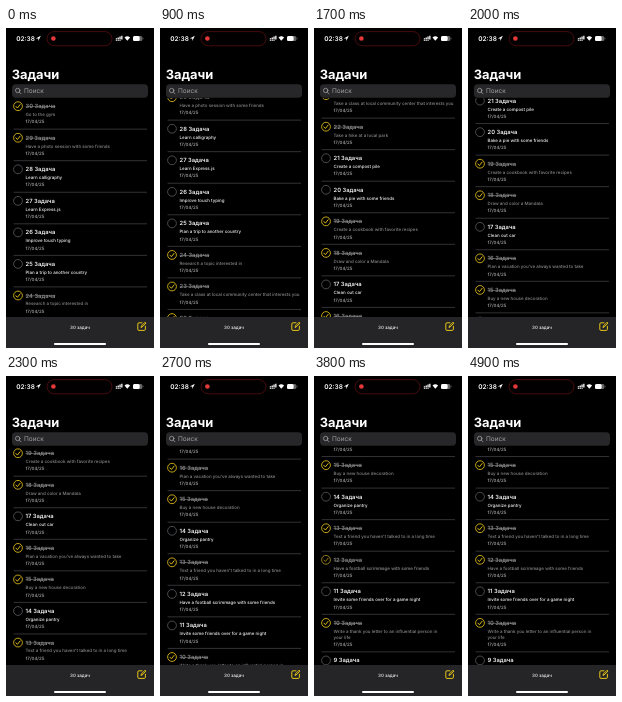
An HTML page that plays this animation: 148 px wide and 320 px high, repeating every 5 s.

```html
<!DOCTYPE html>
<html lang="ru">
<head>
<meta charset="utf-8">
<title>Задачи</title>
<style>
html, body { margin: 0; width: 100%; height: 100%; overflow: hidden; background: #000; }
svg { display: block; width: 100vw; height: 100vh; font-family: Inter, Roboto, sans-serif; text-rendering: geometricPrecision; }
.title { font-size: 5.8px; font-weight: 600; }
.note { font-size: 4.45px; font-weight: 500; }
</style>
</head>
<body>
<svg viewBox="0 0 148 320">
  <defs><clipPath id="view"><rect y="70.3" width="148" height="219"/></clipPath></defs>
  <rect width="148" height="320"/>
  <g clip-path="url(#view)"><g id="list"></g></g>

  <g fill="#fff">
    <text x="10.2" y="12.8" font-size="6.5" font-weight="600">02:38</text>
    <path d="M29.8 10.4L34.8 7.8L32.3 12.9V10.4Z"/>
    <rect x="41" y="3.6" width="65" height="14.2" rx="7.1" fill="#020000" stroke="#5a1014" stroke-width=".8"/>
    <circle cx="47.4" cy="10.5" r="2.3" fill="#e5383a"/>
    <path d="M109.8 10.2h1.3v1.4h-1.3zM111.6 9.4h1.3v2.2h-1.3zM113.4 8.6h1.3v3h-1.3zM115.2 7.8h1.3v3.8h-1.3zM109.8 12.2h1.3v.9h-1.3zM111.6 12.2h1.3v.9h-1.3zM113.4 12.2h1.3v.9h-1.3z"/>
    <path d="M118.5 9.5Q121.3 7 124.1 9.5L121.3 12.8Z"/>
    <rect x="127" y="8.1" width="9.4" height="4.8" rx="1.5" fill="#666"/>
    <rect x="127" y="8.1" width="6.6" height="4.8" rx="1.5"/>
    <rect x="136.8" y="9.7" width=".6" height="1.6" rx=".3" fill="#777"/>
  </g>

  <text x="5.8" y="50.8" font-size="12.9" font-weight="700" fill="#fff">Задачи</text>
  <rect x="6" y="56.2" width="136" height="13.6" rx="3.7" fill="#272729"/>
  <g fill="none" stroke="#a0a0a4" stroke-width=".8" stroke-linecap="round">
    <circle cx="11.7" cy="62.5" r="2.2"/>
    <path d="M13.3 64.1L15 65.8"/>
  </g>
  <text x="18" y="65.3" font-size="6.5" fill="#a0a0a4">Поиск</text>

  <rect y="289" width="148" height="31" fill="#252528"/>
  <text x="74" y="300.6" font-size="4.5" font-weight="500" fill="#f4f4f4" text-anchor="middle">30 задач</text>
  <g fill="none" stroke="#f0cd18" stroke-width=".95" stroke-linecap="round" stroke-linejoin="round">
    <path d="M136 294.8h-3a1.2 1.2 0 0 0-1.2 1.2v5.2a1.2 1.2 0 0 0 1.2 1.2h5.2a1.2 1.2 0 0 0 1.2-1.2v-3"/>
    <path d="M135.1 299.1l.3-1.2 3.7-3.7.9.9-3.7 3.7z"/>
  </g>
  <rect x="48" y="315.1" width="52" height="1.9" rx=".95" fill="#fff"/>
</svg>
<script>
const LOOP = 5000, STEP = 100, PITCH = 31.55, LINE = 6;
const GRAY = '#8a8a8a', DATE = '#b0b0b0', WHITE = '#f4f4f4', YELLOW = '#e6c01c';

// A leading + marks a finished task; | breaks the line.
const TASKS = [
  '+Go to the gym', '+Have a photo session with some friends', 'Learn calligraphy',
  'Learn Express.js', 'Improve touch typing', 'Plan a trip to another country',
  '+Research a topic interested in',
  '+Take a class at local community center that interests you',
  '+Take a hike at a local park', 'Create a compost pile', 'Bake a pie with some friends',
  '+Create a cookbook with favorite recipes', '+Draw and color a Mandala', 'Clean out car',
  "+Plan a vacation you've always wanted to take", '+Buy a new house decoration',
  'Organize pantry', "+Text a friend you haven't talked to in a long time",
  'Have a football scrimmage with some friends', 'Invite some friends over for a game night',
  '+Write a thank you letter to an influential person in|your life', 'Clean the closet'
];

const list = document.getElementById('list');

function add(parent, tag, attrs, text) {
  const el = document.createElementNS('http://www.w3.org/2000/svg', tag);
  for (const k in attrs) el.setAttribute(k, attrs[k]);
  if (text) el.textContent = text;
  parent.appendChild(el);
  return el;
}

function look(row, num, lines, done) {
  const g = add(row, 'g', {});
  const fill = done ? GRAY : WHITE;
  add(g, 'circle', { cx: 12, cy: .2, r: 4.4, fill: 'none', stroke: done ? YELLOW : '#55585c', 'stroke-width': .85 });
  if (done) add(g, 'path', { d: 'M9.9 .4L11.4 2L14.1-1.4', fill: 'none', stroke: YELLOW, 'stroke-width': .95, 'stroke-linecap': 'round' });
  const title = add(g, 'text', { class: 'title', x: 19.6, y: 2.2, fill }, num + ' Задача');
  if (done) title.setAttribute('text-decoration', 'line-through');
  lines.forEach((s, i) => add(g, 'text', { class: 'note', x: 19.5, y: 10.1 + i * LINE, fill }, s));
  return g;
}

let rowY = 78;
const rows = TASKS.map((task, i) => {
  const done = task[0] === '+';
  const lines = task.replace('+', '').split('|');
  const extra = (lines.length - 1) * LINE;
  const row = add(list, 'g', { transform: `translate(0 ${rowY})` });
  if (i) add(row, 'path', { d: 'M7.6-8.4H141', stroke: '#56565a', 'stroke-width': .6 });
  const open = look(row, 30 - i, lines, false);
  const closed = look(row, 30 - i, lines, true);
  add(row, 'text', { class: 'note', x: 19.5, y: 17.4 + extra, fill: DATE }, '17/04/25');
  rowY += PITCH + extra;
  const set = k => { open.setAttribute('opacity', 1 - k); closed.setAttribute('opacity', k); };
  set(done ? 1 : 0);
  return set;
});

// Scroll keys: time, offset
const KEYS = [[640, 0], [1300, 156.2], [1700, 231.9], [2300, 348], [2700, 428.2], [3100, 455.3], [3420, 462.3]];
const slope = i => (KEYS[i + 1][1] - KEYS[i][1]) / (KEYS[i + 1][0] - KEYS[i][0]);
function tangent(i) {
  if (i === 0 || i === KEYS.length - 1) return 0;
  const a = slope(i - 1), b = slope(i);
  return 2 * a * b / (a + b);
}

function scroll(t) {
  const last = KEYS.length - 1;
  if (t <= KEYS[0][0]) return 0;
  if (t >= KEYS[last][0]) return KEYS[last][1];
  const i = KEYS.findIndex(k => k[0] > t) - 1;
  const [t0, y0] = KEYS[i], [t1, y1] = KEYS[i + 1];
  const h = t1 - t0, u = (t - t0) / h, v = 1 - u;
  return y0 * v * v * (1 + 2 * u) + y1 * u * u * (3 - 2 * u)
    + h * u * v * (v * tangent(i) - u * tangent(i + 1));
}

const start = performance.now();
function draw() {
  const t = Math.floor((performance.now() - start) % LOOP / STEP) * STEP;
  list.setAttribute('transform', `translate(0 ${-scroll(t)})`);
  rows[18](Math.min(1, Math.max(0, (t - 3600) / 300)));
  requestAnimationFrame(draw);
}
draw();
</script>
</body>
</html>
```
